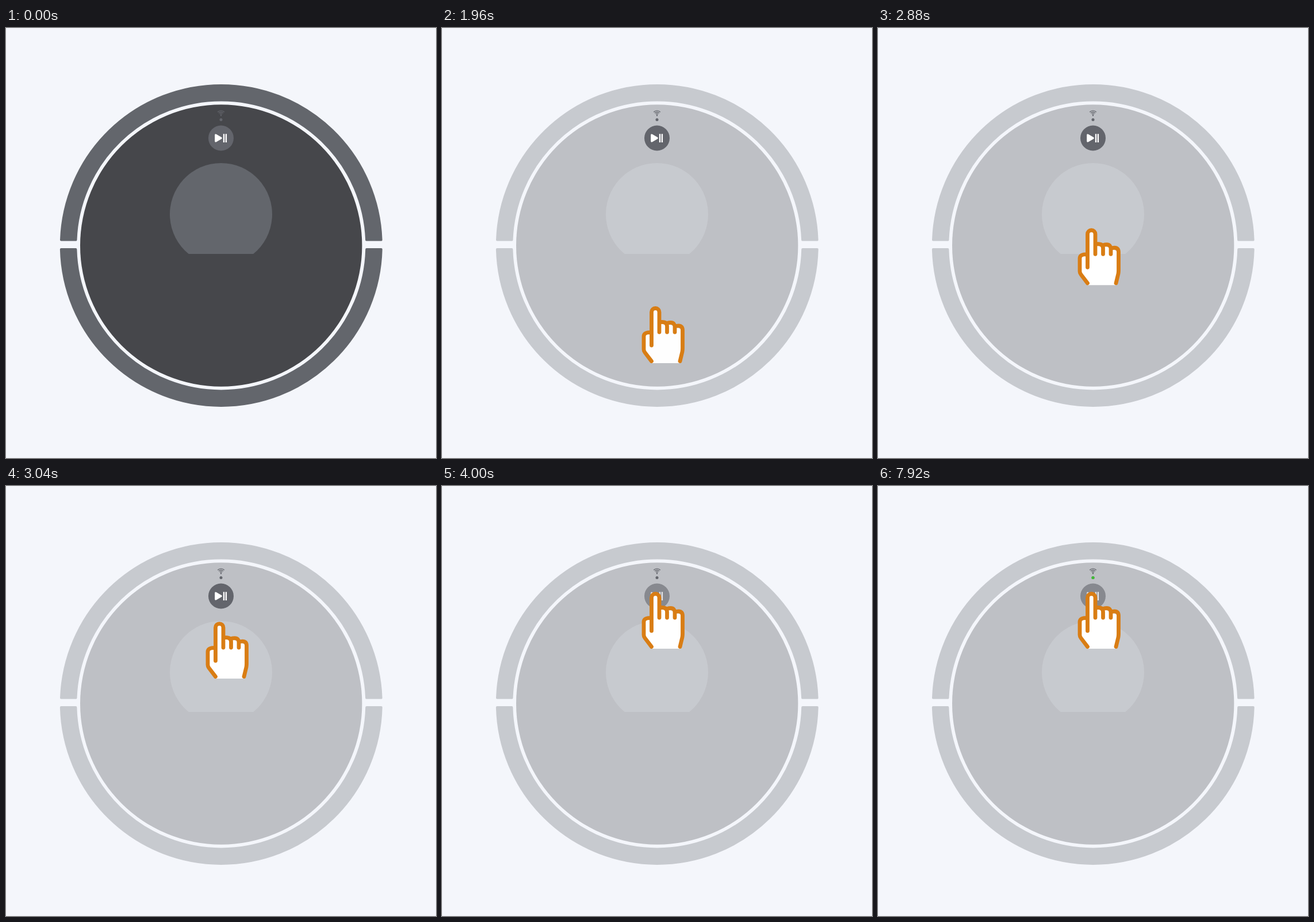
These frames come from a looping animation (748x748 px, 8000 ms). An HTML page:

```html
<!DOCTYPE html>
<html lang="en">
<head>
<meta charset="utf-8">
<title>Robot vacuum button</title>
<style>
  html, body { margin: 0; width: 100%; height: 100%; overflow: hidden; background: #f4f6fb; }
  svg { display: block; width: 100%; height: 100%; }
</style>
</head>
<body>
<svg viewBox="0 0 748 748">
  <g id="robot">
    <g fill="#63666c" stroke="#63666c" stroke-width="4" stroke-linejoin="round">
      <path id="bumperTop"/>
      <path id="bumperBottom"/>
    </g>
    <circle cx="374.2" cy="378.5" r="245.2" fill="#46474b"/>
    <path d="M317.8 393A89 89 0 1 1 430.2 393Z" fill="#63666c"/>
  </g>
  <g fill="none" stroke="#63656c" stroke-width="1.3">
    <path d="M368.2 146.2a8.2 8.2 0 0 1 11.6 0M370.1 148.1a5.5 5.5 0 0 1 7.8 0M372 150a2.8 2.8 0 0 1 4 0"/>
    <circle cx="374" cy="152" r="1.2" fill="#63656c" stroke="none"/>
  </g>
  <circle cx="374" cy="159.5" r="2.5" fill="#63656c"/>
  <circle id="led" cx="374" cy="159.5" r="2.6" fill="#40bb36"/>
  <g id="button">
    <circle cx="374" cy="191.5" r="22" fill="#63656c"/>
    <path d="M364 186.2V196.8Q364 198.2 365.4 197.6L374.4 192.4Q375.6 191.5 374.4 190.6L365.4 185.4Q364 184.8 364 186.2Z"
          fill="#fff" stroke="#fff" stroke-width="1.6" stroke-linejoin="round"/>
    <path d="M379 184.3V198.9M382.9 184.3V198.9" stroke="#fff" stroke-width="2.4"/>
  </g>
  <g id="hand">
    <path fill="#fff" d="M364.5 283L352 264L351 236Q352 229.5 364.5 229.5V194.25A6.75 6.75 0 0 1 378 194.25V211.5L391.5 214L405 219L418.5 225V257L414 283Z"/>
    <path fill="none" stroke="#d97d14" stroke-width="6.8" stroke-linecap="round" stroke-linejoin="round"
          d="M364.5 252V194.25A6.75 6.75 0 0 1 378 194.25V229
             M364.5 229.5C356 229 351 231 351 236.5V259Q351 262 353 264.5L364.5 279.6
             M378 211.5H383C388.5 211.5 391.5 214 391.5 219V229
             M391.5 213.5Q394.5 212.5 398 212.5C402.5 212.5 405 215.5 405 220V229
             M405 219.5Q408 218 411.5 218C416 218 418.5 220.5 418.5 225.5V257Q418.5 260 418 263L414 279.6"/>
  </g>
</svg>
<script>
  const LOOP = 8000;
  const $ = id => document.getElementById(id);
  const robot = $('robot'), led = $('led'), button = $('button'), hand = $('hand');

  const ease = (t, from, to) => {
    const p = Math.min(1, Math.max(0, (t - from) / (to - from)));
    return p * p * (3 - 2 * p);
  };

  // Half ring whose two flat ends lie at height y
  function bumper(y, sweep) {
    const cx = 374.3, cy = 378.4, outer = 278.5, inner = 253;
    const half = r => Math.sqrt(r * r - (y - cy) ** 2);
    const o = half(outer), i = half(inner);
    return `M${cx - o} ${y}A${outer} ${outer} 0 0 ${sweep} ${cx + o} ${y}` +
      `H${cx + i}A${inner} ${inner} 0 0 ${1 - sweep} ${cx - i} ${y}Z`;
  }

  function draw(t) {
    const reveal = ease(t, 1000, 2000);
    robot.setAttribute('opacity', 1 - 0.7 * reveal);
    hand.setAttribute('opacity', reveal);
    hand.setAttribute('transform', `translate(0 ${300 * (1 - ease(t, 2600, 3200))})`);
    button.setAttribute('opacity', 1 - 0.4 * ease(t, 3240, 3440));
    led.setAttribute('opacity', t < 7000 ? 0 : 1 - ease(t, 7200, 7420) + ease(t, 7520, 7900));
  }

  $('bumperTop').setAttribute('d', bumper(368.6, 1));
  $('bumperBottom').setAttribute('d', bumper(385, 0));

  const start = performance.now();
  function tick() {
    draw((performance.now() - start) % LOOP);
    requestAnimationFrame(tick);
  }
  tick();
</script>
</body>
</html>
```
